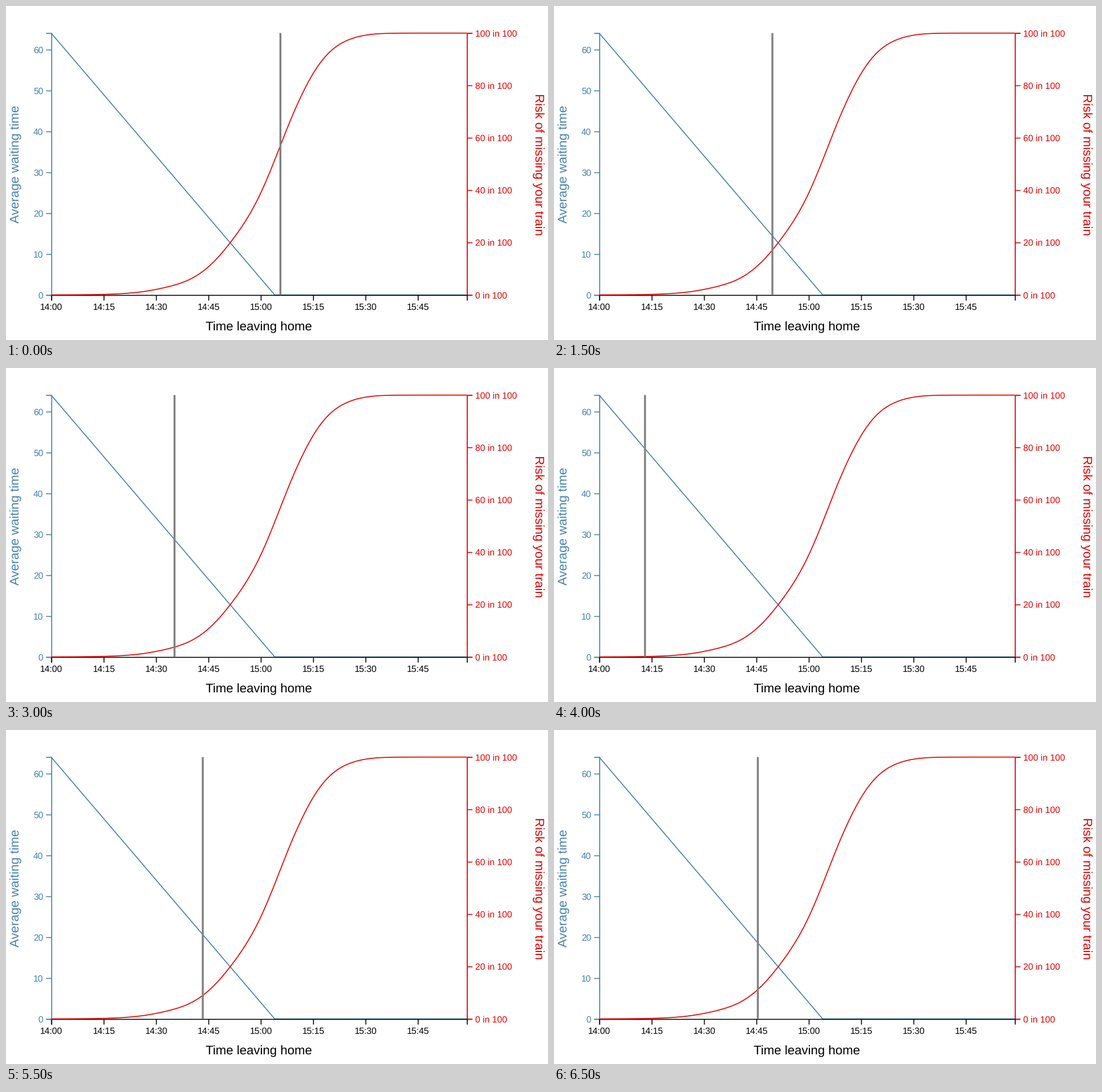
Recreate the animation shown at these times as a matplotlib script. Size 953 by 588 pixels, loop 8500 ms.

```python
import math

import numpy as np
import matplotlib.pyplot as plt
from matplotlib.animation import FuncAnimation

W, H, DPI = 953, 588, 64
PT = 72 / DPI  # points per pixel
BLUE, RED, GRAY = "#4682b4", "#e60000", "#808080"
LEFT, RIGHT, TOP, BASE = 80.3, 811, 48.2, 509.4
TICK = 9.2
PX_MIN, PX_WAIT, PX_RISK = 6.137, 7.2, 4.61
START, ZERO = 79.8, 508.7  # origin of the data curves

plt.rcParams.update({
    "font.family": "Liberation Sans",
    "text.hinting": "none",
    "path.snap": False,
})

fig = plt.figure(figsize=(W / DPI, H / DPI), dpi=DPI, facecolor="white")
ax = fig.add_axes([0, 0, 1, 1])
ax.set(xlim=(0, W), ylim=(H, 0))
ax.axis("off")


def line(xs, ys, color, width=1.6, z=2):
    return ax.plot(xs, ys, color=color, lw=width * PT, zorder=z,
                   solid_capstyle="butt", solid_joinstyle="miter")[0]


def label(x, y, text, color, size=15.7, ha="center", rotation=0):
    ax.text(x, y, text, color=color, fontsize=size * PT, ha=ha, va="baseline",
            rotation=rotation, rotation_mode="anchor")


def side_axis(x, tick, color):
    line([x + tick, x, x, x + tick], [TOP, TOP, BASE, BASE], color, 1.8, 3)


def smooth(ys, steps=20):
    """Cubic Hermite curve through evenly spaced values, one unit apart."""
    slope = np.gradient(ys)
    u = np.linspace(0, 1, steps, endpoint=False)
    parts = [(1 + 2 * u) * (1 - u) ** 2 * ys[i] + u * (1 - u) ** 2 * slope[i]
             + u * u * (3 - 2 * u) * ys[i + 1] + u * u * (u - 1) * slope[i + 1]
             for i in range(len(ys) - 1)]
    return np.concatenate(parts)


def normal_cdf(z):
    return 0.5 * (1 + math.erf(z / math.sqrt(2)))


# Time axis
line([LEFT, LEFT, RIGHT, RIGHT], [BASE + TICK, BASE, BASE, BASE + TICK],
     "black", z=4.5)
for minute in range(0, 120, 15):
    x = LEFT + minute * PX_MIN
    line([x, x], [BASE, BASE + TICK], "black")
    label(x - 0.3, 534.6, f"{14 + minute // 60}:{minute % 60:02d}", "black")
label(445, 571, "Time leaving home", "black", 22.3)

# Waiting time axis
side_axis(LEFT, -TICK - 0.6, BLUE)
for wait in range(0, 61, 10):
    y = BASE - wait * PX_WAIT
    line([LEFT - TICK - 0.6, LEFT], [y, y], BLUE, z=3)
    label(65.6, y + 5.4, str(wait), BLUE, ha="right")
label(23.6, 278.3, "Average waiting time", BLUE, 22.4, rotation=90)

# Risk axis
side_axis(RIGHT, TICK, RED)
for risk in range(0, 101, 20):
    y = BASE - 0.3 - risk * PX_RISK
    line([RIGHT, RIGHT + TICK], [y, y], RED, z=3)
    label(824.6, y + 5.4, f"{risk} in 100", RED, ha="left")
label(929.5, 278.5, "Risk of missing your train", RED, 22.4, rotation=270)

# Waiting time falls by one minute per minute until the train leaves
line([START, START + 64 * PX_MIN, RIGHT], [TOP, ZERO, ZERO], BLUE, 1.7, 4)

# Risk is a skewed bell's running total: standard scores at ten minute steps
scores = [-3.6, -3.1, -2.58, -2.03, -1.54, -0.92, -0.28, 0.565, 1.483, 2.41,
          3.5, 4.5, 5.5]
z = smooth(scores)
minutes = np.linspace(0, 120, len(z), endpoint=False)
risks = np.array([100 * normal_cdf(v) for v in z])
shown = minutes <= 119
line(START + minutes[shown] * PX_MIN, ZERO - risks[shown] * PX_RISK, RED, 1.7, 5)

# Marker, which jumps to a new place every half second and then rests
stops = [482.5, 357.5, 354, 384, 342.5, 346, 296.3, 270, 160, 290.5, 334.5,
         346, 351, 358.4]
marker = line([stops[0]] * 2, [TOP - 0.6, ZERO], GRAY, 3.4, 6)


def update(i):
    x = stops[min(i, len(stops) - 1)]
    marker.set_xdata([x, x])
    return marker,


anim = FuncAnimation(fig, update, frames=17, interval=500, repeat=True,
                     repeat_delay=0)
plt.show()
```
